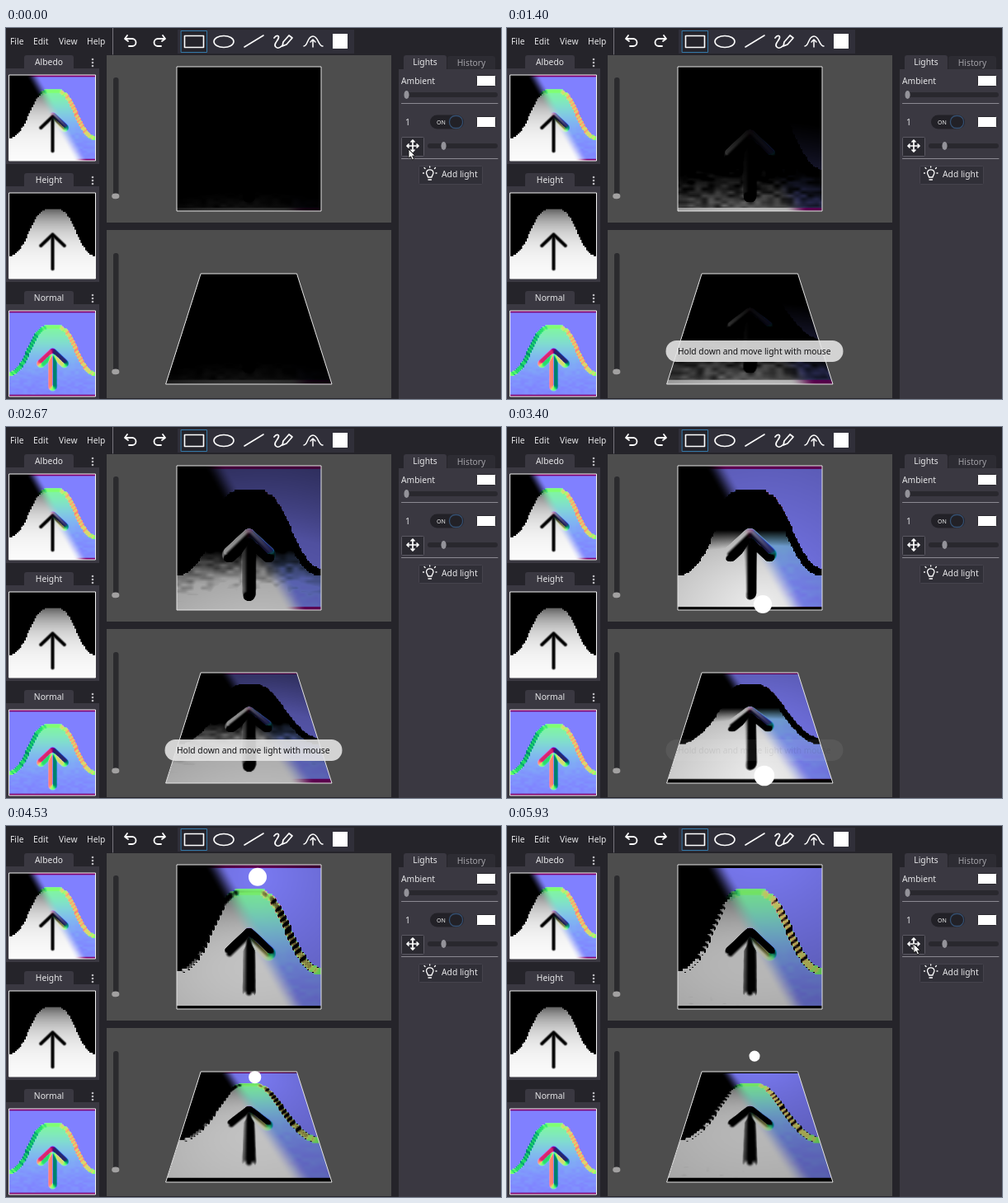
Animation of 600x450 px, one loop 6 s. Source, as an HTML page with a canvas:

```html
<!DOCTYPE html>
<html>
<head>
<meta charset="utf-8">
<style>
html, body { margin: 0; width: 100%; height: 100%; overflow: hidden; background: #25242a; }
canvas { display: block; }
</style>
</head>
<body>
<canvas id="stage" width="600" height="450"></canvas>
<script>
const LOOP = 6000, STEP = 1000 / 15, N = 175, SQUARE = { x: 207, y: 47 };
const TRAPEZOID = { cx: 294.5, top: 298, height: 134, topWidth: 116, bottomWidth: 201 };
const GROW = TRAPEZOID.bottomWidth - TRAPEZOID.topWidth;
const FONT = '"Noto Sans", "Open Sans", sans-serif';
const ctx = document.getElementById('stage').getContext('2d');

const clamp = (x, lo = 0, hi = 1) => Math.min(hi, Math.max(lo, x));
const mix = (a, b, k) => a + (b - a) * k;
const smooth = (a, b, x) => { const k = clamp((x - a) / (b - a)); return k * k * (3 - 2 * k); };
const hash = (a, b) => { const s = Math.sin(a * 12.9898 + b * 78.233) * 43758.5453; return s - Math.floor(s); };

function softNoise(x, y) {
  const a = Math.floor(x), b = Math.floor(y), k = smooth(0, 1, x - a);
  return mix(mix(hash(a, b), hash(a + 1, b), k), mix(hash(a, b + 1), hash(a + 1, b + 1), k), y - b);
}

function layer(w, h) {
  const canvas = document.createElement('canvas');
  canvas.width = w;
  canvas.height = h;
  return canvas.getContext('2d');
}

// ---- textures ----
const hillEdge = u => 0.745 - 0.56 * Math.exp(-Math.pow(Math.abs(u - 0.5) / 0.31, 3.2));
const cell = i => (Math.floor(i / 3) + 0.5) * 3 / N;
const inHill = (i, j) => cell(j) > hillEdge(cell(i));

function segmentDistance(x, y, [ax, ay, bx, by]) {
  const dx = bx - ax, dy = by - ay;
  const k = clamp(((x - ax) * dx + (y - ay) * dy) / (dx * dx + dy * dy));
  return Math.hypot(x - ax - k * dx, y - ay - k * dy);
}

const ARROW = [[0.5, 0.49, 0.5, 0.885], [0.5, 0.485, 0.365, 0.615], [0.5, 0.485, 0.635, 0.615]];

function heightAt(i, j) {
  if (!inHill(i, j)) return 0;
  const u = (i + 0.5) / N, v = (j + 0.5) / N;
  const hill = 0.35 + 0.65 * (1 - Math.exp(-(v - 0.18) / 0.22));
  const gap = Math.min(...ARROW.map(s => segmentDistance(u, v, s)));
  return hill * smooth(0.006, 0.033, gap);
}

const heights = new Float32Array(N * N);
const normals = new Float32Array(N * N * 3);
const albedo = new Float32Array(N * N * 3);
const heightMap = layer(N, N), normalMap = layer(N, N), albedoMap = layer(N, N), litMap = layer(N, N);

function paint(target, colour) {
  const image = target.createImageData(N, N);
  for (let p = 0; p < N * N; p++) {
    for (let c = 0; c < 3; c++) image.data[p * 4 + c] = colour(p, c);
    image.data[p * 4 + 3] = 255;
  }
  target.putImageData(image, 0, 0);
}

function normalColour(p, c) {
  const n = normals[p * 3 + c];
  return c === 0 ? 128 + 127 * n : c === 1 ? 128 - 127 * n : 100 + 155 * n;
}

const index = (i, j) => ((j + N) % N) * N + (i + N) % N;

function blurred(source, reach) {
  return source.map((_, p) => {
    let sum = 0;
    for (let y = -reach; y <= reach; y++) {
      for (let x = -reach; x <= reach; x++) sum += source[index(p % N + x, Math.floor(p / N) + y)];
    }
    return sum / (2 * reach + 1) ** 2;
  });
}

function buildTextures() {
  for (let p = 0; p < N * N; p++) heights[p] = heightAt(p % N, Math.floor(p / N));
  const relief = blurred(heights, 2);
  const at = (i, j) => relief[index(i, j)];
  const reach = 2, scale = 0.88 * N / (2 * reach);
  for (let j = 0; j < N; j++) {
    for (let i = 0; i < N; i++) {
      const p = j * N + i, v = j / N;
      const x = -(at(i + reach, j) - at(i - reach, j)) * scale;
      let y = -(at(i, j + reach) - at(i, j - reach)) * scale;
      if (inHill(i, j)) y += (softNoise(i / 8, j / 4) - 0.5) * 0.14 * smooth(0.5, 0.7, v);
      const length = Math.hypot(x, y, 1);
      normals.set([x / length, y / length, 1 / length], p * 3);
      const border = 0.26 + 0.57 * v, blend = smooth(border - 0.08, border + 0.08, i / N);
      for (let c = 0; c < 3; c++) albedo[p * 3 + c] = mix(heights[p] * 255, normalColour(p, c), blend);
    }
  }
  paint(heightMap, p => heights[p] * 255);
  paint(normalMap, normalColour);
  paint(albedoMap, (p, c) => albedo[p * 3 + c]);
}

// ---- light ----
// time, u, v, power
const PATH = [
  [0, 0.5, 3.36, 2.5], [400, 0.5, 3.36, 2.5], [1400, 0.55, 2.87, 1.6], [2670, 0.58, 1.6, 0.9],
  [3400, 0.589, 0.96, 1], [3930, 0.586, 0.56, 1], [4530, 0.56, 0.086, 1],
  [5050, 0.555, -0.25, 1.05], [6000, 0.553, -0.274, 1.05]
];
const LIGHT_HEIGHT = 0.4, RANGE = 2.5;

function lightAt(t) {
  const k = Math.max(1, PATH.findIndex(key => key[0] > t));
  const a = PATH[k - 1], b = PATH[k], f = (t - a[0]) / (b[0] - a[0]);
  return { u: mix(a[1], b[1], f), v: mix(a[2], b[2], f), power: mix(a[3], b[3], f) };
}

const litImage = litMap.createImageData(N, N);
function shade(light) {
  const out = litImage.data;
  for (let p = 0; p < N * N; p++) {
    const x = light.u - (p % N) / N, y = light.v - Math.floor(p / N) / N;
    const far = Math.sqrt(x * x + y * y), length = Math.sqrt(far * far + LIGHT_HEIGHT * LIGHT_HEIGHT);
    const facing = (normals[p * 3] * x + normals[p * 3 + 1] * y + normals[p * 3 + 2] * LIGHT_HEIGHT) / length;
    const fade = (0.95 - 0.23 * far) * clamp((RANGE - far) / 0.7);
    const level = clamp(facing * 3) * fade * light.power;
    for (let c = 0; c < 3; c++) out[p * 4 + c] = albedo[p * 3 + c] * level;
    out[p * 4 + 3] = 255;
  }
  litMap.putImageData(litImage, 0, 0);
}

// ---- drawing helpers ----
function box(g, x, y, w, h, fill, radius = 0, stroke) {
  g.beginPath();
  g.roundRect(x, y, w, h, radius);
  if (fill) { g.fillStyle = fill; g.fill(); }
  if (stroke) { g.strokeStyle = stroke; g.lineWidth = 1; g.stroke(); }
}

function label(g, text, x, y, colour = '#e6e6e8', align = 'left', size = 10.3) {
  g.font = `${size}px ${FONT}`;
  g.textAlign = align;
  g.fillStyle = colour;
  g.fillText(text, x, y);
}

function oval(g, x, y, rx, ry, fill) {
  g.beginPath();
  g.ellipse(x, y, rx, ry, 0, 0, Math.PI * 2);
  g.fillStyle = fill;
  g.fill();
}

function line(g, path, width = 1.8, colour = '#fff') {
  g.strokeStyle = colour;
  g.lineWidth = width;
  g.lineCap = g.lineJoin = 'round';
  g.stroke(new Path2D(path));
}

// ---- static interface ----
const PANEL = '#3a3841', DARK = '#25242a', GROOVE = '#29282e';

function drawToolbar(g) {
  [['File', 5], ['Edit', 33], ['View', 64], ['Help', 98]].forEach(([text, x]) => label(g, text, x, 19.5));
  line(g, 'M129.5 0V32', 1, '#77757d');
  line(g, 'M147 9L144 13L148 16M145 13H153A4.5 4.5 0 0 1 153 22H149');
  line(g, 'M190 9L193 13L189 16M192 13H184A4.5 4.5 0 0 0 184 22H188');
  box(g, 208, 2, 214, 29, '#302f39');
  box(g, 212.5, 3.5, 31, 26, '#25242b', 0, '#3479a8');
  line(g, 'M216.5 9.5H239.5V23.5H216.5Z', 1.6);
  line(g, 'M252 16.5A12 7 0 0 1 276 16.5A12 7 0 0 1 252 16.5', 1.6);
  line(g, 'M289 23L312 9', 1.6);
  line(g, 'M325 12C328 8 332 9 330 13C328 17 324 20 327 23C329 25 332 24 334 22M335 22L336 17L343 9L347 12L340 20Z', 1.7);
  line(g, 'M361 22C366 22 365 10 372 10C379 10 378 22 384 22M372 23V14M369 17L372 14L375 17', 1.5);
  box(g, 396, 7, 18, 18, '#fff');
}

function drawThumbnail(g, name, y, map) {
  box(g, 0, y + 16, 113, 116, PANEL);
  box(g, 22, y, 60, 17, PANEL, [3, 3, 0, 0]);
  label(g, name, 52, y + 12, '#e6e6e8', 'center');
  for (let k = -1; k <= 1; k++) oval(g, 105, y + 9 + k * 4, 1.3, 1.3, '#b9b8bd');
  g.drawImage(map.canvas, 4, y + 24, 105, 104);
  box(g, 4, y + 24, 104.5, 104, null, 0, '#f4f4f4');
}

function drawView(g, y, height, trackY) {
  box(g, 122, y, 345, height, '#4d4d4d');
  box(g, 130, trackY, 6.5, 148, '#2b2b2e', 3);
  oval(g, 132.8, trackY + 144, 4.6, 3.4, '#a2a1a1');
}

function drawSlider(g, x, y, width, knob) {
  box(g, x, y - 3, width, 6, GROOVE, 3);
  oval(g, knob, y, 3.1, 5, '#94939a');
}

function drawLights(g) {
  box(g, 476, 50, 124, 400, PANEL);
  box(g, 482, 33, 52, 18, PANEL, [3, 3, 0, 0]);
  box(g, 535, 34, 58, 16, '#2d2c33', [3, 3, 0, 0]);
  label(g, 'Lights', 508, 45, '#e8e8ea', 'center');
  label(g, 'History', 564, 45.5, '#a2a1a7', 'center');
  label(g, 'Ambient', 479, 67.5);
  for (const y of [58, 108]) box(g, 570.5, y - 0.5, 23, 13, '#fff', 1, '#29282e');
  drawSlider(g, 482, 81, 114, 485.5);
  line(g, 'M479.5 91.5H596', 1, '#8b8991');
  label(g, '1', 484, 117.5);
  box(g, 514, 105.5, 41, 17, '#222127', 8.5);
  label(g, 'ON', 522, 116.5, '#eee', 'left', 7);
  g.beginPath();
  g.roundRect(537.5, 106.5, 16, 15, 7);
  g.strokeStyle = '#344f70';
  g.lineWidth = 1.3;
  g.stroke();
  box(g, 479.5, 132.5, 27, 23, '#2b2a31', 1, '#5b5963');
  line(g, 'M493 136V150M486 143H500M491 138L493 136L495 138M491 148L493 150L495 148M488 141L486 143L488 145M498 141L500 143L498 145', 1.7);
  drawSlider(g, 511, 143, 85, 530.5);
  line(g, 'M479.5 158.5H596', 1, '#8b8991');
  box(g, 500.5, 167.5, 77, 22, '#302f37', 1, '#45434d');
  line(g, 'M511.5 181C511.5 179 509.5 178 509.5 175.5A4.3 4.3 0 0 1 518 175.5C518 178 516 179 516 181ZM512 184H515.5M513.7 169V168M508 170.5L507 169.5M519.5 170.5L520.5 169.5M506.5 176H505.5M521 176H522', 1.3);
  label(g, 'Add light', 528, 181);
}

const ui = layer(600, 450);
function buildInterface() {
  box(ui, 0, 0, 600, 450, DARK);
  drawToolbar(ui);
  drawThumbnail(ui, 'Albedo', 33, albedoMap);
  drawThumbnail(ui, 'Height', 176, heightMap);
  drawThumbnail(ui, 'Normal', 319, normalMap);
  drawView(ui, 33, 203, 60);
  drawView(ui, 245, 204, 273);
  drawLights(ui);
}

// ---- animated parts ----
function inView(y, height, draw) {
  ctx.save();
  ctx.beginPath();
  ctx.rect(122, y, 345, height);
  ctx.clip();
  draw();
  ctx.restore();
}

function drawFlat(light) {
  ctx.drawImage(litMap.canvas, SQUARE.x, SQUARE.y);
  box(ctx, SQUARE.x, SQUARE.y, N, N, null, 0, '#e4e4e4');
  oval(ctx, SQUARE.x + light.u * N, SQUARE.y + light.v * N, 11, 11, '#fff');
}

function drawTilted(light) {
  const { cx, top, height, topWidth, bottomWidth } = TRAPEZOID;
  const depth = s => bottomWidth * s / (topWidth + GROW * s);
  for (let row = 0; row < height; row++) {
    const from = depth(row / height) * N, to = depth((row + 1) / height) * N;
    const width = topWidth + GROW * (row + 0.5) / height;
    ctx.drawImage(litMap.canvas, 0, from, N, to - from, cx - width / 2, top + row, width, 1);
  }
  line(ctx, 'M236.5 298H352.5L395 432H194Z', 1, '#e4e4e4');
  if (light.v < 1.4) {
    const s = topWidth * light.v / (bottomWidth - GROW * light.v);
    const width = topWidth + GROW * s, r = width * 0.063;
    oval(ctx, cx + (light.u - 0.5) * width, top + s * height, r, r, '#fff');
  }
}

function drawTooltip(t) {
  const alpha = smooth(300, 650, t) * (1 - clamp((t - 2900) / 540));
  if (alpha <= 0) return;
  ctx.globalAlpha = alpha;
  box(ctx, 192.5, 379, 215, 26, 'rgba(230,230,230,0.88)', 13);
  label(ctx, 'Hold down and move light with mouse', 299.7, 395.5, '#121214', 'center', 10.25);
  ctx.globalAlpha = 1;
}

function drawPointer(t) {
  if (t > 300 && t < 5400) return;
  ctx.save();
  if (t < 1000) ctx.translate(488, 147);
  else ctx.translate(493, 143);
  const shape = new Path2D('M0 0V11L2.6 8.8L4.5 13L6.5 12L4.7 8H8Z');
  ctx.fillStyle = '#fff';
  ctx.fill(shape);
  ctx.strokeStyle = '#111';
  ctx.lineWidth = 0.9;
  ctx.stroke(shape);
  ctx.restore();
}

function render(t) {
  const light = lightAt(t);
  shade(light);
  ctx.drawImage(ui.canvas, 0, 0);
  inView(33, 203, () => drawFlat(light));
  inView(245, 204, () => drawTilted(light));
  drawTooltip(t);
  drawPointer(t);
}

buildTextures();
buildInterface();

const start = performance.now();
let shown = -1;
function tick(now) {
  const step = Math.floor(((Math.max(0, now - start) + 4) % LOOP) / STEP);
  if (step !== shown) {
    shown = step;
    render(step * STEP);
  }
  requestAnimationFrame(tick);
}
tick(start);
</script>
</body>
</html>
```
